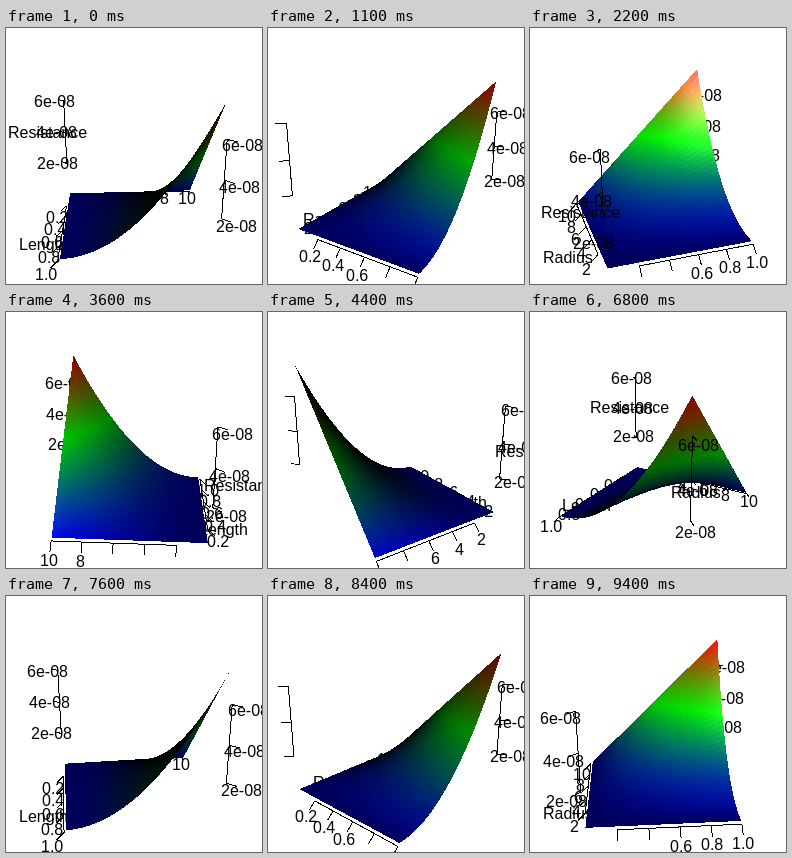
Animation of 256x256 px, one loop 9500 ms. Source, as an HTML page:

```html
<!DOCTYPE html>
<html lang="en">
<head>
<meta charset="utf-8">
<title>Resistance surface</title>
<style>
  html, body { margin: 0; width: 100%; height: 100%; overflow: hidden; background: #fff; }
  svg { display: block; width: 256px; height: 256px; font: 16px "Liberation Sans", Arial, sans-serif; }
  path { shape-rendering: crispEdges; }
</style>
</head>
<body>
<svg id="plot" viewBox="0 0 256 256"></svg>
<script>
const plot = document.getElementById('plot');
const ruler = document.createElement('canvas').getContext('2d');
ruler.font = '16px "Liberation Sans", Arial, sans-serif';

const RAD = Math.PI / 180;
const SIZE = 256, FRAME = 100, FRAMES = 95;
const START = -86.5, STEP = 4.8;          // degrees, degrees per frame
const CELLS = 40;

// Camera: 20 degrees above the floor, 30 degree field of view around the unit cube.
const TILT_C = Math.cos(20 * RAD), TILT_S = Math.sin(20 * RAD);
const RADIUS = Math.sqrt(3) / 2;
const DIST = RADIUS / Math.sin(15 * RAD);
const FOCAL = SIZE / 2 / Math.tan(15 * RAD);

const EDGE = 0.515, TICK = 0.05;
const fifths = [1, 2, 3, 4, 5];
const zTicks = [2, 4, 6].map(v => ({ pos: v / 7.7 - 0.5, text: v + 'e-08' }));
const axes = [
  { dim: 0, sign: -1, title: 'Length',
    ticks: fifths.map(k => ({ pos: k / 5 - 0.5, text: (k / 5).toFixed(1) })) },
  { dim: 1, sign: -1, title: 'Radius',
    ticks: fifths.map(k => ({ pos: k / 5 - 0.5, text: String(k * 2) })) },
  { dim: 2, sign: -1, title: 'Resistance', ticks: zTicks },
  { dim: 2, sign: 1, ticks: zTicks }
];

let cos = 1, sin = 0;

// World vector to camera axes: right, up, towards the viewer.
function toCamera([x, y, z]) {
  const depth = x * sin + y * cos;
  return [x * cos - y * sin, z * TILT_C + depth * TILT_S, z * TILT_S - depth * TILT_C];
}

function project(point) {
  const [right, up, near] = toCamera(point);
  const scale = FOCAL / (DIST - near);
  return { x: SIZE / 2 + right * scale, y: SIZE / 2 - up * scale, near };
}

const surface = (u, v) => [u - 0.5, v - 0.5, u * v * v - 0.5];
const dot = (a, b) => a[0] * b[0] + a[1] * b[1] + a[2] * b[2];

function unit(vec) {
  const length = Math.hypot(...vec);
  return vec.map(c => c / length);
}

// Blue - green - red ramp, lit on both sides by a headlight with a white highlight.
function shade(u, v) {
  const normal = unit(toCamera([-v * v, -2 * u * v, 1]));
  const [right, up, near] = toCamera(surface(u, v));
  const eye = unit([-right, -up, DIST - near]);
  const half = unit([eye[0], eye[1], eye[2] + 1]);
  const facing = Math.abs(normal[2]);
  const glint = Math.abs(dot(normal, half)) ** 50;
  const h = u * v * v;
  const ramp = [Math.max(0, 2 * h - 1), 1 - Math.abs(2 * h - 1), Math.max(0, 1 - 2 * h)];
  return 'rgb(' + ramp.map(c => Math.round(255 * Math.min(1, c * facing + glint))) + ')';
}

const trace = points => 'M' + points.map(p => p.x.toFixed(2) + ' ' + p.y.toFixed(2)).join('L');

function addSurface(items) {
  const grid = [];
  for (let i = 0; i <= CELLS; i++) {
    grid.push([]);
    for (let j = 0; j <= CELLS; j++) grid[i].push(project(surface(i / CELLS, j / CELLS)));
  }
  for (let i = 0; i < CELLS; i++) {
    for (let j = 0; j < CELLS; j++) {
      const quad = [grid[i][j], grid[i + 1][j], grid[i + 1][j + 1], grid[i][j + 1]];
      const near = quad.reduce((sum, p) => sum + p.near, 0) / 4;
      const color = shade((i + 0.5) / CELLS, (j + 0.5) / CELLS);
      items.push({ near, mark: `<path d="${trace(quad)}Z" fill="${color}"/>` });
    }
  }
}

function addLine(items, from, to) {
  const ends = [project(from), project(to)];
  items.push({
    near: (ends[0].near + ends[1].near) / 2,
    mark: `<path d="${trace(ends)}" stroke="#000"/>`
  });
}

// A label vanishes as a whole once its baseline start leaves the stage.
function addText(items, point, text) {
  const p = project(point);
  const left = p.x - ruler.measureText(text).width / 2;
  const base = p.y + 8.15;
  if (left < 0 || base > SIZE) return;
  items.push({
    near: p.near,
    mark: `<text x="${Math.floor(left)}" y="${Math.round(base)}">${text}</text>`
  });
}

function addAxis(items, { dim, sign, title, ticks }) {
  const at = (pos, out) => {
    const point = Array(3).fill(sign * (EDGE + out * TICK));
    point[dim] = pos;
    return point;
  };
  ticks.forEach(({ pos, text }, i) => {
    if (i) addLine(items, at(ticks[i - 1].pos, 0), at(pos, 0));
    addLine(items, at(pos, 0), at(pos, 1));
    addText(items, at(pos, 1.5), text);
  });
  if (title) addText(items, at(0, 3), title);
}

function render(frame) {
  const angle = (START + STEP * frame) * RAD;
  cos = Math.cos(angle);
  sin = Math.sin(angle);
  const items = [];
  addSurface(items);
  axes.forEach(axis => addAxis(items, axis));
  items.sort((a, b) => a.near - b.near);
  plot.innerHTML = items.map(item => item.mark).join('');
}

const begin = performance.now();
let shown = -1;

function tick() {
  const frame = Math.floor((performance.now() - begin) / FRAME) % FRAMES;
  if (frame !== shown) render(shown = frame);
  requestAnimationFrame(tick);
}
tick();
</script>
</body>
</html>
```
